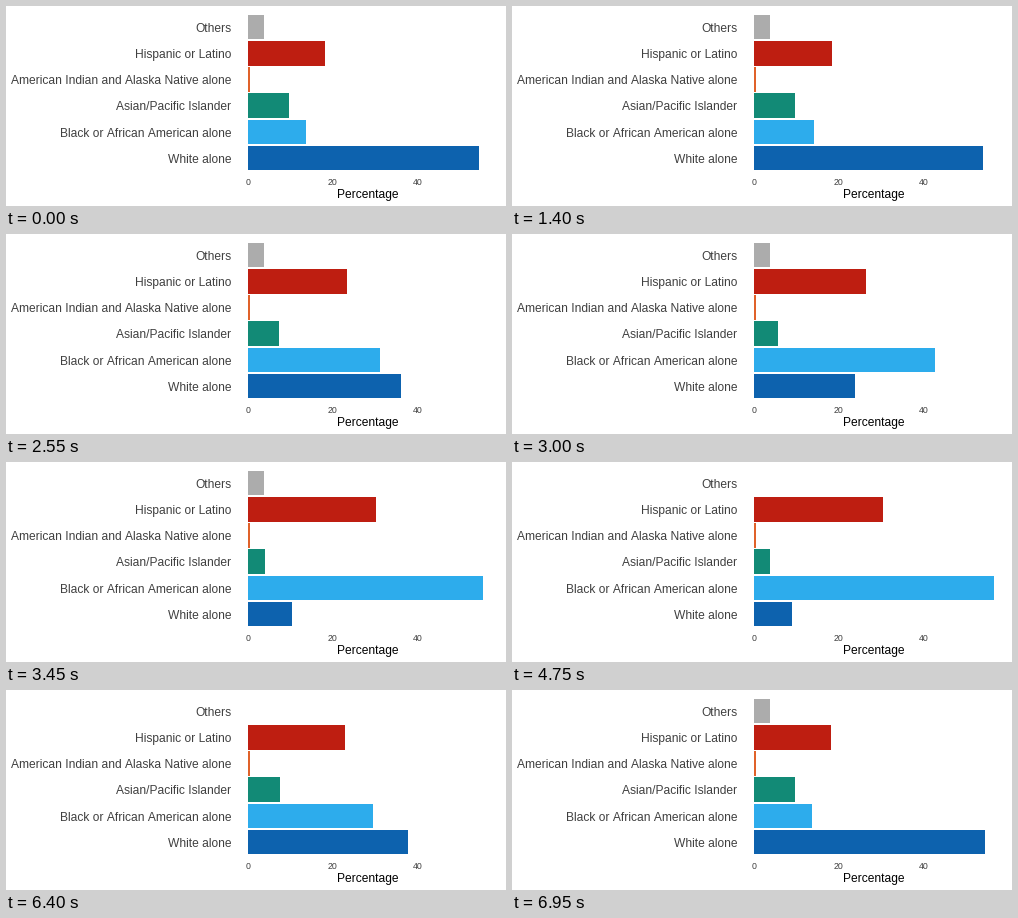
Recreate the animation shown at these times as a matplotlib script. Size 500x200 px, loop 7000 ms.

```python
import math

import matplotlib.pyplot as plt
from matplotlib.animation import FuncAnimation

W, H, DPI = 500, 200, 100
FRAMES, INTERVAL = 140, 50
ZERO_X, TICK_STEP = 242, 84.7
ROW_TOP, ROW_STEP, BAR_HEIGHT = 21.2, 26.15, 23.5

# label, colour, bar length in each state (None: absent)
ROWS = [
    ("Others", "#acacac", 16, None),
    ("Hispanic or Latino", "#be1e11", 77, 128.8),
    ("American Indian and Alaska Native alone", "#e0622a", 1.2, 1.2),
    ("Asian/Pacific Islander", "#128a76", 40.9, 15.45),
    ("Black or African American alone", "#2dacec", 57.2, 240.4),
    ("White alone", "#0d62ae", 230.9, 37.3),
]

plt.rcParams.update({
    "font.family": "Liberation Sans",
    "text.hinting": "force_autohint",
    "text.kerning_factor": 6,
    "toolbar": "None",
})

fig = plt.figure(figsize=(W / DPI, H / DPI), dpi=DPI, facecolor="white")
ax = fig.add_axes([0, 0, 1, 1])
ax.set(xlim=(0, W), ylim=(H, 0))
ax.axis("off")


def label(x, baseline, text, size, ha, color="#404040"):
    ax.text(x, baseline, text, fontsize=size * 72 / DPI, ha=ha,
            va="baseline", color=color)


bars = []
for row, (name, color, first, _) in enumerate(ROWS):
    center = ROW_TOP + row * ROW_STEP
    bar = plt.Rectangle((ZERO_X, center - BAR_HEIGHT / 2), first, BAR_HEIGHT,
                        facecolor=color, linewidth=0, snap=False,
                        antialiased=False)
    bars.append(ax.add_patch(bar))
    label(225, round(center + 4.8), name, 12, "right")

for k in range(3):
    label(ZERO_X + k * TICK_STEP, 179, str(20 * k), 8.8, "center")
label(362, 192, "Percentage", 12, "center", "black")


def sine_in(p):
    return 1 - math.cos(min(max(p, 0), 1) * math.pi / 2)


def update(i):
    if i <= 70:
        mix = sine_in((i - 23) / 47)
    else:
        mix = 1 - sine_in((i - 93) / 46)
    for bar, (_, _, first, second) in zip(bars, ROWS):
        if second is None:
            bar.set_visible(i < 70 or i == FRAMES - 1)
        else:
            bar.set_width(first + (second - first) * mix)
    return bars


anim = FuncAnimation(fig, update, frames=FRAMES, interval=INTERVAL,
                     repeat=True, repeat_delay=0)
plt.show()
```
